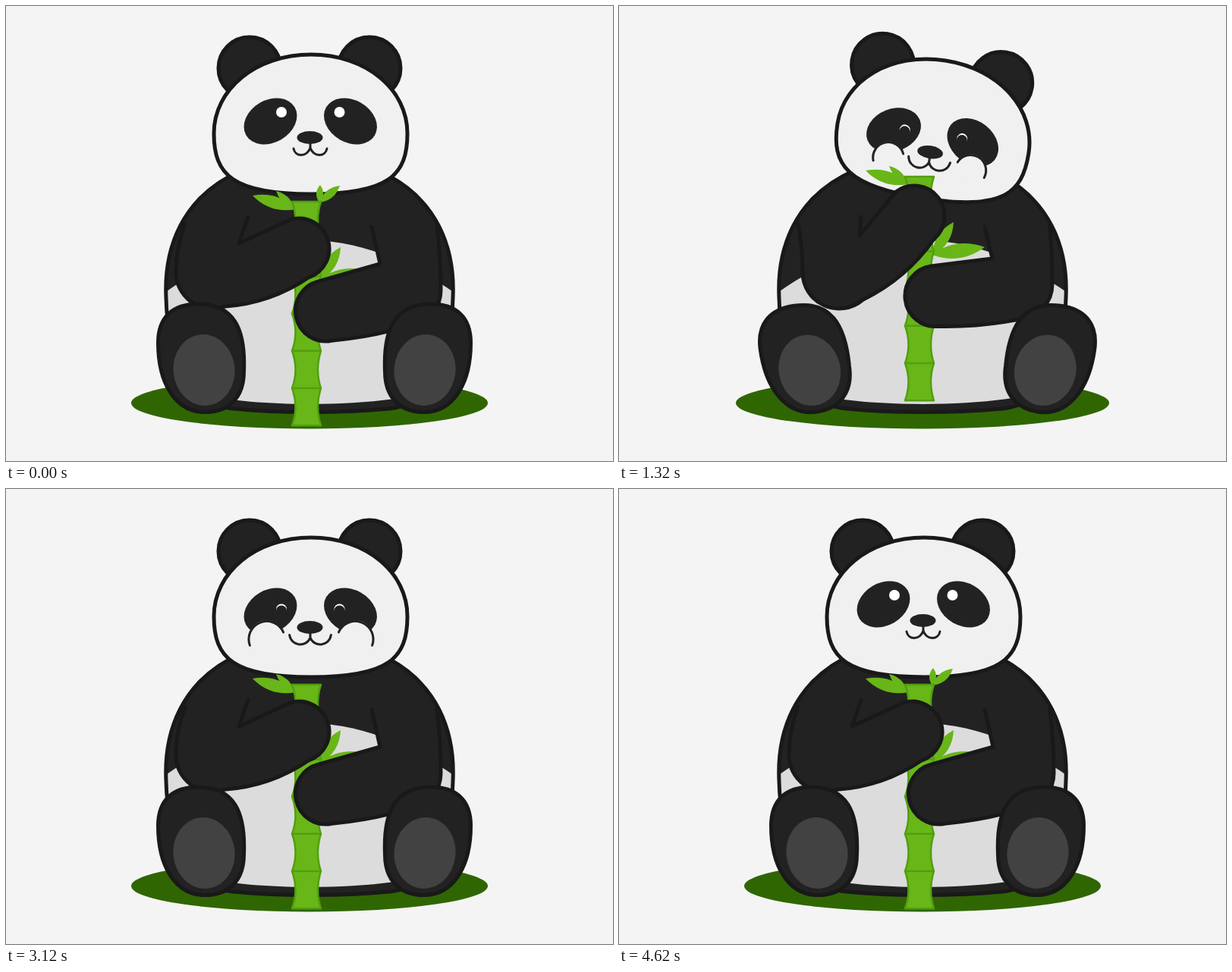
Animation of 800 by 600 pixels, one loop 4680 ms. Source, as an HTML page:

```html
<!DOCTYPE html>
<html lang="en">
<head>
<meta charset="utf-8">
<title>Panda with bamboo</title>
<style>
  html, body { margin: 0; width: 100%; height: 100%; overflow: hidden; background: #f4f4f4; }
  svg { display: block; width: 100%; height: 100%; }
  .ink { fill: #222; stroke: #191919; stroke-width: 5; }
  .line { fill: none; stroke: #191919; stroke-width: 5; stroke-linecap: round; stroke-linejoin: round; }
  .thin { fill: none; stroke: #222; stroke-width: 3; stroke-linecap: round; stroke-linejoin: round; }
  .face { fill: #f0f0f0; }
  .dark { fill: #222; }
  .leaf { fill: #68b618; }
</style>
</head>
<body>
<svg viewBox="0 0 800 600">
  <defs>
    <g id="leg">
      <path class="ink" d="M253 393C300 393 316 425 313.500 482C313.500 517 293 535.500 262 535.500C225 535.500 200.500 500 200.500 444C200.500 410 220 393 253 393Z"/>
      <ellipse cx="261" cy="480" rx="40.500" ry="47" fill="#424242" transform="rotate(-6 261 480)"/>
    </g>
    <clipPath id="trunk">
      <path id="body" d="M310 217C230 252 208 322 211 385C213 460 235 526 300 531C360 537 440 537 505 531C565 526 587 460 589 385C592 322 570 252 490 217Z"/>
    </clipPath>
  </defs>

  <ellipse id="shadow" cx="400" cy="523.500" ry="34" fill="#2f6602"/>

  <use href="#body" class="dark"/>
  <path clip-path="url(#trunk)" fill="#dcdcdc" d="M205 381C255 345 325 309 400 309C475 309 545 345 595 381V495C530 535 270 535 205 495Z"/>
  <use href="#body" class="line"/>

  <g id="head">
    <circle class="ink" cx="321" cy="82" r="41"/>
    <circle class="ink" cx="479" cy="82" r="41"/>
    <path class="face" stroke="#191919" stroke-width="5" d="M402 64C475 64 529 110 529 168C529 223 505 248 402 248C299 248 274 223 274 168C274 110 329 64 402 64Z"/>
    <g id="features">
      <ellipse class="dark" cx="348.500" cy="152" rx="37" ry="28" transform="rotate(-30 348.500 152)"/>
      <ellipse class="dark" cx="454" cy="152" rx="37" ry="28" transform="rotate(30 454 152)"/>
      <g id="eyes">
        <circle cx="363" cy="140" r="7" fill="#fff"/>
        <circle cx="439.500" cy="140" r="7" fill="#fff"/>
        <g id="lids" class="dark">
          <circle cx="363" cy="140" r="7"/>
          <circle cx="439.500" cy="140" r="7"/>
        </g>
      </g>
      <g id="cheeks">
        <g id="cheek">
          <circle class="face" id="puff" cy="188"/>
          <path class="thin" id="rim"/>
        </g>
        <use href="#cheek" transform="translate(804 0) scale(-1 1)"/>
      </g>
      <ellipse class="dark" cx="400.500" cy="173.500" rx="17" ry="8.500"/>
      <path class="thin" id="mouth"/>
    </g>
  </g>

  <g id="bamboo">
    <path class="leaf" id="leaves"/>
    <path class="leaf" id="sprig"/>
    <path id="stem" fill="#68b618" stroke="#519f10" stroke-width="2.500" stroke-linejoin="round"/>
  </g>

  <g transform="translate(813 0) scale(-1 1)">
    <path class="dark" id="rightFill"/><path class="line" id="rightLine"/>
  </g>
  <path class="dark" id="leftFill"/><path class="line" id="leftLine"/>

  <use href="#leg" id="leftLeg"/>
  <g transform="translate(813 0) scale(-1 1)"><use href="#leg" id="rightLeg"/></g>
</svg>

<script>
const LOOP = 4680, STEP = 60;
const $ = id => document.getElementById(id);
const set = (id, attrs) => {
  for (const k in attrs) $(id).setAttribute(k, attrs[k]);
};
const move = (id, value) => set(id, { transform: value });
const mix = (a, b, u) => a + (b - a) * u;
const polar = ([x, y], r, a) => [x + r * Math.cos(a), y + r * Math.sin(a)];

// Eased value at time t from alternating times and values.
function key(t, ...k) {
  if (t <= k[0]) return k[1];
  for (let i = 2; i < k.length; i += 2) {
    if (t < k[i]) {
      const p = (t - k[i - 2]) / (k[i] - k[i - 2]);
      return mix(k[i - 1], k[i + 1], p * p * (3 - 2 * p));
    }
  }
  return k[k.length - 1];
}

// Joints are x, y and the shift when raised; the right arm is mirrored.
const ARMS = {
  left: {
    hand: [386, 320, 3, -43], elbow: [272, 351, 18, 0], inner: [307, 313, 10, -10],
    shoulder: [236, 287], crease: [319, 278], r: 40, R: 48, bulge: 16
  },
  right: {
    hand: [391.5, 402, 4.5, -19.5], elbow: [286, 375, 2, -8], inner: [320, 340, 1, -7],
    shoulder: [245, 290], crease: [331, 291], r: 40, R: 46, bulge: 6
  }
};

// A tapered limb: an elbow circle and a hand circle joined by a tangent.
function drawArm(id, u) {
  const { hand, elbow, inner, shoulder, crease, r, R, bulge } = ARMS[id];
  const [h, e, c] = [hand, elbow, inner].map(([x, y, dx, dy]) => [x + dx * u, y + dy * u]);
  const dx = h[0] - e[0], dy = h[1] - e[1];
  const axis = Math.atan2(dy, dx);
  const under = axis + Math.acos((R - r) / Math.hypot(dx, dy));
  const from = polar(e, R, under), to = polar(h, r, under);
  const belly = polar([(from[0] + to[0]) / 2, (from[1] + to[1]) / 2], bulge, under);
  const side = e[0] - R;
  const d = `M${shoulder}Q${side} ${(shoulder[1] + e[1]) / 2} ${side} ${e[1]}` +
    `A${R} ${R} 0 0 0 ${from}Q${belly} ${to}` +
    `A${r} ${r} 0 0 0 ${polar(h, r, axis - Math.PI / 2)}L${c}L${crease}`;
  set(id + 'Line', { d });
  set(id + 'Fill', { d: d + 'Z' });
}

function leaf(x, y, tipX, tipY, width) {
  const dx = tipX - x, dy = tipY - y, k = width / Math.hypot(dx, dy);
  const side = s => `${x + dx / 2 - s * dy * k} ${y + dy / 2 + s * dx * k}`;
  return `M${x} ${y}Q${side(1)} ${tipX} ${tipY}Q${side(-1)} ${x} ${y}Z`;
}

function buildBamboo() {
  let d = '';
  for (let i = 0; i < 6; i++) {
    const y = 258 + i * 49.2, b = y + 49.2, m = y + 24.6;
    d += `M377 ${y}H415Q407 ${m} 415 ${b}H377Q386 ${m} 377 ${y}Z`;
  }
  set('stem', { d });
  set('leaves', {
    d: leaf(382, 268, 325, 250, 16) + leaf(380, 266, 356, 244, 9) +
       leaf(413, 362, 441, 318, 15) + leaf(412, 361, 482, 351, 19)
  });
  set('sprig', { d: leaf(413, 259, 414, 236, 9) + leaf(413, 259, 440, 237, 11) });
}

function drawCheek(s) {
  const r = 25 * s, mid = [367 - r, 188];
  const at = deg => polar(mid, r, deg * Math.PI / 180);
  set('cheeks', { visibility: s > 0.05 ? 'visible' : 'hidden' });
  set('puff', { cx: mid[0], r });
  set('rim', { d: `M${at(157)}A${r} ${r} 0 0 1 ${at(-20)}` });
}

function drawMouth(w) {
  const y = 188 - (w - 1) * 18;
  const half = s => `M${401 + s * 22 * w} ${y}C${401 + s * 20 * w} 199 ${401 + s * 5} 200 401 187`;
  set('mouth', { d: `M401 181V187${half(-1)}${half(1)}` });
}

function draw(t) {
  const lift = key(t, 240, 0, 1140, 1, 1920, 1, 2340, 0);
  const tilt = key(t, 1020, 0, 1440, 11, 1860, 11, 2220, 0);
  const drop = key(t, 240, 0, 840, 8, 1440, 5.5, 1860, 5.5, 2220, 0);
  const face = key(t, 640, 0, 1260, 13, 1860, 13, 2220, 9, 4080, 9, 4440, 0);
  const look = key(t, 240, 0, 780, 9.5, 4080, 9.5, 4440, 0);
  const lid = key(t, 660, 20, 1020, 2, 3660, 2, 3900, 20);
  const spread = key(t, 300, 0, 780, -0.75, 840, -0.75, 1080, 1, 1860, 1, 2160, 0);
  const open = Math.max(spread, 0);

  const chewing = key(t, 1260, 0, 1440, 1, 3480, 1, 3840, 0);
  const slack = chewing * (1 - Math.cos((t - 2520) / 720 * 2 * Math.PI)) / 2;
  const cheek = key(t, 1140, 0, 1380, 1, 3600, 1, 4020, 0.82, 4320, 0);
  const smile = key(t, 300, 1, 840, 1.27, 1200, 1.32, 3600, 1.32, 3960, 1);

  const size = key(t, 1110, 1, 1230, 0, 3720, 0, 4020, 1);
  const swing = key(t, 3720, 0, 4020, -25, 4260, 0);

  move('head', `translate(0 ${drop}) rotate(${tilt} 402 249)`);
  move('features', `translate(0 ${face})`);
  move('eyes', `translate(0 ${look})`);
  move('lids', `translate(0 ${lid})`);
  drawCheek(cheek * (1 - 0.2 * slack));
  drawMouth(smile - 0.3 * slack);

  move('bamboo', `translate(0 ${-33 * lift})`);
  move('sprig', `translate(413 259) rotate(${swing}) scale(${size}) translate(-413 -259)`);
  drawArm('left', lift);
  drawArm('right', lift);

  const leg = `translate(${-7 * spread}) rotate(${-8 * open} 262 500)`;
  move('leftLeg', leg);
  move('rightLeg', leg);
  set('shadow', { rx: 235 + 11 * open });
}

const start = performance.now();
function frame() {
  const t = (performance.now() - start) % LOOP;
  draw(Math.floor(t / STEP) * STEP);
  requestAnimationFrame(frame);
}

buildBamboo();
draw(0);
requestAnimationFrame(frame);
</script>
</body>
</html>
```
